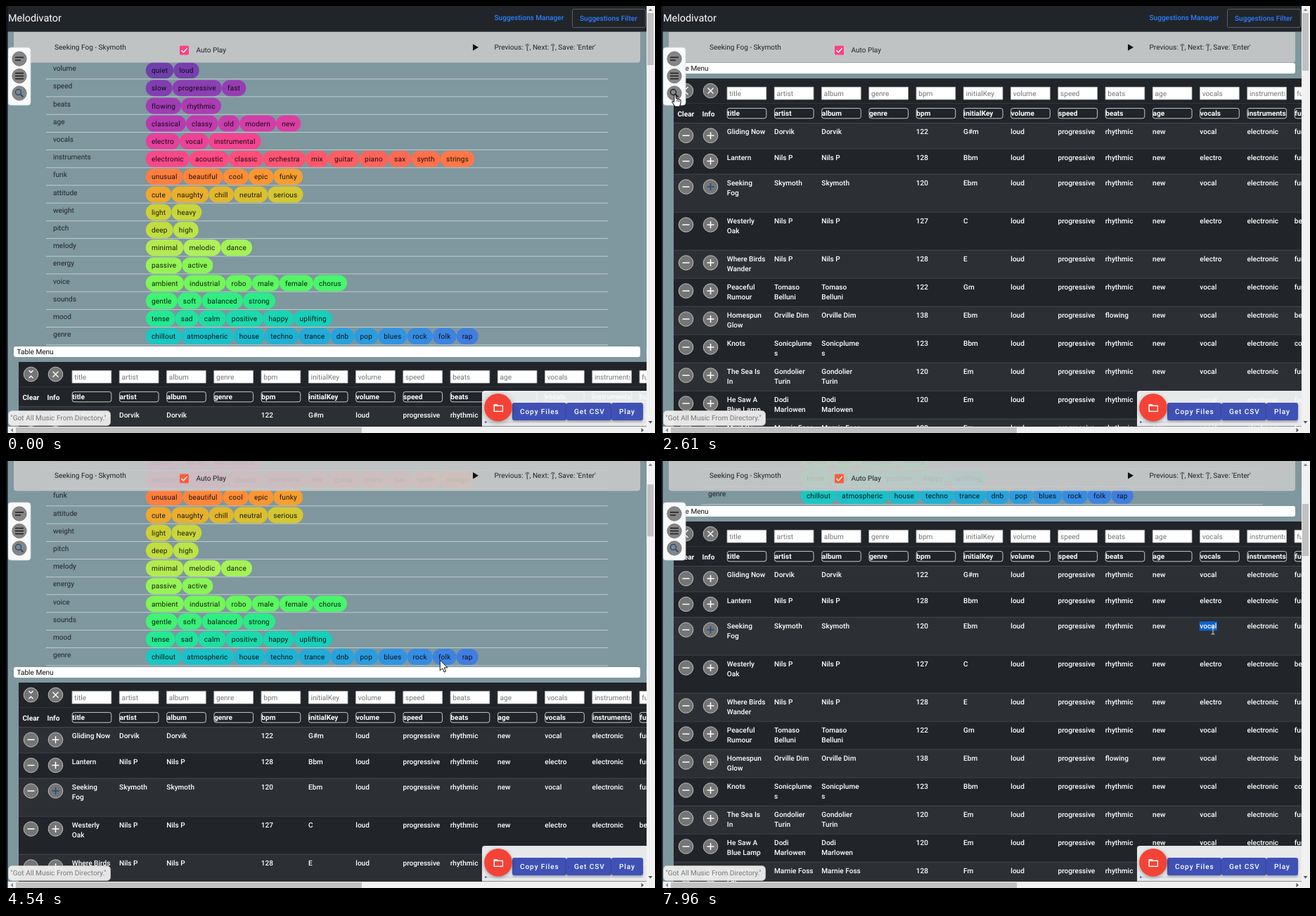
Animation of 923 by 607 pixels, one loop 8 s. Source, as an HTML page with a canvas:

```html
<!DOCTYPE html>
<html lang="en">
<head>
<meta charset="utf-8">
<title>Music table</title>
<style>
html, body { margin: 0; width: 100%; height: 100%; overflow: hidden; background: #7f979e; }
canvas { display: block; }
</style>
</head>
<body>
<canvas id="stage" width="923" height="607"></canvas>
<script>
const ctx = document.getElementById('stage').getContext('2d');
const LOOP = 8000, DARK = '#212529', FONT = 'Roboto, sans-serif';
const HAIR = 0.75; // thickness of a one-pixel rule at the page's zoom

const TAGS = [
  'volume: quiet loud', 'speed: slow progressive fast', 'beats: flowing rhythmic',
  'age: classical classy old modern new', 'vocals: electro vocal instrumental',
  'instruments: electronic acoustic classic orchestra mix guitar piano sax synth strings',
  'funk: unusual beautiful cool epic funky', 'attitude: cute naughty chill neutral serious',
  'weight: light heavy', 'pitch: deep high', 'melody: minimal melodic dance',
  'energy: passive active', 'voice: ambient industrial robo male female chorus',
  'sounds: gentle soft balanced strong', 'mood: tense sad calm positive happy uplifting',
  'genre: chillout atmospheric house techno trance dnb pop blues rock folk rap'
].map(line => {
  const [label, words] = line.split(': ');
  return { label, words: words.split(' ') };
});

const COLUMNS = ['title', 'artist', 'album', 'genre', 'bpm', 'initialKey', 'volume',
  'speed', 'beats', 'age', 'vocals', 'instruments', 'funk'];
const colX = i => 93.8 + i * 67.25;

// title | artist | bpm | key | beats | vocals | funk
const ROWS = [
  'Gliding Now|Dorvik|122|G#m|rhythmic|vocal|funky',
  'Lantern|Nils P|128|Bbm|rhythmic|electro|funky',
  'Seeking/Fog|Skymoth|120|Ebm|rhythmic|vocal|funky',
  'Westerly/Oak|Nils P|127|C|rhythmic|electro|beautiful',
  'Where Birds/Wander|Nils P|128|E|rhythmic|electro|funky',
  'Peaceful/Rumour|Tomaso/Belluni|122|Gm|rhythmic|vocal|funky',
  'Homespun/Glow|Orville Dim|138|Ebm|flowing|vocal|beautiful',
  'Knots|Sonicplume/s|123|Bbm|rhythmic|vocal|cool',
  'The Sea Is/In|Gondolier/Turin|120|Em|rhythmic|vocal|funky',
  'He Saw A/Blue Lamp|Dodi/Marlowen|120|Em|rhythmic|vocal|funky',
  'Must Go/Far|Marnie Foss|128|Fm|rhythmic|vocal|funky',
  'Tin Roof|Marnie Foss|124|Am|rhythmic|vocal|funky'
].map(line => {
  const [title, artist, bpm, key, beats, vocals, funk] = line.split('|');
  return [title, artist, artist, '', bpm, key, 'loud', 'progressive', beats, 'new',
    vocals, 'electronic', funk].map(cell => cell.split('/'));
});
const rowHeight = i => i < 2 ? 36.4 : i < 4 ? 54 : 40;

// time, x, y of the pointer tip
const POINTER = [
  [530, 893, 592], [1150, 312, 206], [1220, 255, 168], [1280, 200, 157],
  [1480, 42, 101], [1550, 32, 105], [1810, 30, 108], [2080, 20, 126], [2900, 20, 126],
  [3150, 130, 90], [3400, 290, 98], [3640, 365, 165], [3990, 352, 225], [4200, 420, 245],
  [4540, 617, 283], [5090, 761, 190], [5290, 775, 200], [5490, 775, 200],
  [5780, 768, 162], [6240, 794, 200], [6500, 794, 200], [7300, 783, 237],
  [7900, 783, 237], [7960, 785, 241]
];
const SCROLL = [[4060, 0], [4540, 191], [5070, 420]];

function track(keys, t) {
  if (t <= keys[0][0]) return keys[0].slice(1);
  for (let i = 1; i < keys.length; i++) {
    const a = keys[i - 1], b = keys[i];
    if (t < b[0]) {
      const f = (t - a[0]) / (b[0] - a[0]);
      return a.slice(1).map((v, k) => v + (b[k + 1] - v) * f);
    }
  }
  return keys[keys.length - 1].slice(1);
}

function rainbow(t) {
  const d = Math.abs(t - 0.5), s = 1.5 - 1.5 * d, l = 0.8 - 0.9 * d;
  const h = (360 * t + 20) * Math.PI / 180, a = s * l * (1 - l);
  const c = Math.cos(h), n = Math.sin(h);
  const rgb = [-0.14861 * c + 1.78277 * n, -0.29227 * c - 0.90649 * n, 1.97294 * c];
  return `rgb(${rgb.map(v => Math.round(255 * Math.min(1, Math.max(0, l + a * v))))})`;
}

function setFont(weight = 400, size = 10.08, spacing = 0) {
  ctx.font = `${weight} ${size}px ${FONT}`;
  ctx.letterSpacing = spacing + 'px';
  ctx.textRendering = 'geometricPrecision';
}

function text(str, x, y, color = DARK, weight, size, spacing) {
  setFont(weight, size, spacing);
  ctx.fillStyle = color;
  ctx.fillText(str, x, y + 3.6);
}

function box(x, y, w, h, fill, r = 0, stroke) {
  ctx.beginPath();
  ctx.roundRect(x, y, w, h, r);
  if (fill) { ctx.fillStyle = fill; ctx.fill(); }
  if (stroke) { ctx.strokeStyle = stroke; ctx.lineWidth = HAIR; ctx.stroke(); }
}

function disc(x, y, r, fill, stroke) {
  box(x - r, y - r, 2 * r, 2 * r, fill, r, stroke);
}

function lines(color, width, ...paths) {
  ctx.strokeStyle = color;
  ctx.lineWidth = width;
  ctx.beginPath();
  for (const p of paths)
    for (let i = 0; i < p.length; i += 2) ctx[i ? 'lineTo' : 'moveTo'](p[i], p[i + 1]);
  ctx.stroke();
}

function polygon(points, fill, stroke) {
  ctx.beginPath();
  for (let i = 0; i < points.length; i += 2) ctx.lineTo(points[i], points[i + 1]);
  ctx.closePath();
  ctx.fillStyle = fill;
  ctx.fill();
  if (stroke) { ctx.strokeStyle = stroke; ctx.lineWidth = 1; ctx.stroke(); }
}

function clipped(x, y, w, h, draw) {
  ctx.save();
  ctx.beginPath();
  ctx.rect(x, y, w, h);
  ctx.clip();
  draw();
  ctx.restore();
}

function drawTags(scroll) {
  let index = 0;
  TAGS.forEach(({ label, words }, i) => {
    const y = 91.5 + i * 25.2 - scroll;
    text(label, 67, y - 3);
    box(57, y + 11.9, 799, HAIR, '#d6dee0');
    let x = 198.8;
    for (const word of words) {
      setFont(400, 10.08, 0.18);
      const w = ctx.measureText(word).width + 16.2;
      box(x, y - 11.5, w, 23, rainbow(index++ / 80), 11.5);
      text(word, x + 8.1, y, 'rgba(0,0,0,.87)', 400, 10.08, 0.18);
      x += w;
    }
  });
}

function roundIcon(x, y) {
  disc(x, y, 10.3, '#757575', '#e4e4e4');
}

function isSelected(row, col, t) {
  if (t >= 7500) return row === 2 && col === 10;
  if (t < 5860 || t >= 6560) return false;
  return row === 0 ? col >= 10 : row === 1 && t >= 6040 && col <= 10;
}

function drawTable(top, t) {
  box(18, top + 15, 893, 700, DARK);
  const iconY = top + 32.5, headY = top + 64.5;
  roundIcon(35.5, iconY);
  roundIcon(70.5, iconY);
  lines('#fff', 1.4,
    [32.5, iconY - 5.5, 35.5, iconY - 2.5, 38.5, iconY - 5.5],
    [32.5, iconY + 5.5, 35.5, iconY + 2.5, 38.5, iconY + 5.5],
    [66.5, iconY - 4, 74.5, iconY + 4], [74.5, iconY - 4, 66.5, iconY + 4]);
  box(18, top + 50, 893, HAIR, '#373b3e');
  text('Clear', 23.5, headY + 0.5, '#fff', 700);
  text('Info', 58.5, headY + 0.5, '#fff', 700);
  COLUMNS.forEach((name, i) => {
    const x = colX(i);
    box(x + 0.3, top + 27.3, 55.6, 17.6, '#fff', 0, '#c4c4c4');
    clipped(x + 2, top + 27, 52, 18, () => text(name, x + 3.5, top + 36, '#757575'));
    box(x + 0.4, top + 57.4, 55.6, 14.4, null, 3, '#fff');
    text(name, x + 0.5, headY, '#fff', 700);
  });

  let y = top + 78;
  ROWS.forEach((cells, row) => {
    const h = rowHeight(row);
    box(18, y, 893, h, row % 2 ? DARK : '#2c3034');
    box(18, y, 893, HAIR, '#4d5154');
    const cy = y + 18.2;
    roundIcon(35.5, cy);
    roundIcon(70.5, cy);
    lines('#fff', 1.5, [30.5, cy, 40.5, cy]);
    lines(row === 2 ? '#1b4f80' : '#fff', 1.5,
      [65.5, cy, 75.5, cy], [70.5, cy - 5, 70.5, cy + 5]);
    cells.forEach((parts, col) => parts.forEach((part, n) => {
      const x = colX(col), ty = y + 12.7 + n * 14;
      if (part && isSelected(row, col, t)) {
        setFont(500);
        box(x - 0.5, ty - 6.3, ctx.measureText(part).width + 1, 13, '#0b63d1');
      }
      text(part, x, ty, '#fff', 500);
    }));
    y += h;
  });
}

function drawPlayer(scroll) {
  const y = Math.max(37 - scroll, -1);
  box(11, y, 891, 43.5, 'rgba(200,200,200,.9)', [0, 0, 4, 4]);
  text('Seeking Fog - Skymoth', 69, y + 21);
  box(247, y + 19.5, 13, 13, scroll > 100 ? '#ff5b3d' : '#ff4081', 1.5);
  lines('#fff', 1.5, [249.5, y + 26, 252.3, y + 29, 257.7, y + 23]);
  text('Auto Play', 270.5, y + 25.2);
  polygon([664, y + 17, 664, y + 26.5, 672, y + 21.7], '#111');
  text("Previous: '[', Next: ']', Save: 'Enter'", 694.5, y + 21);
}

function drawNav(scroll) {
  const y = -scroll;
  box(2, y, 909, 36.5, DARK);
  text('Melodivator', 3, y + 18.8, '#fff', 400, 14.4);
  text('Suggestions Manager', 694.5, y + 16, '#2b7fff', 500);
  box(805.5, y + 4.5, 104, 26, null, 2, '#6c757d');
  text('Suggestions Filter', 816, y + 17, '#2b7fff', 500);
}

function drawSidePanel(pressed) {
  box(3, 59, 32, 82, '#f8f9fa', 4, '#d4d9db');
  for (const y of [75, 99.5, 124]) disc(19, y, 10.2, '#858585', '#707070');
  lines('#1c1c1c', 1.5, [13, 73, 25, 73], [13, 77, 21, 77],
    [13, 95.5, 25, 95.5], [13, 99.5, 25, 99.5], [13, 103.5, 25, 103.5]);
  const ink = pressed ? '#222' : '#1b4f80';
  ctx.beginPath();
  ctx.arc(17.5, 122.5, 4, 0, 7);
  ctx.strokeStyle = ink;
  ctx.lineWidth = 1.4;
  ctx.stroke();
  lines(ink, 1.8, [20.5, 125.5, 24.5, 129.5]);
}

function drawToast() {
  box(3.5, 575.5, 145, 21, 'rgba(240,240,240,.95)', 5, '#ccc');
  text('"Got All Music From Directory."', 6.5, 585.5, '#777');
}

function drawActions(t) {
  box(677, 547, 234, 50.5, 'rgba(248,249,250,.92)', [4, 0, 0, 0]);
  box(681, 590.5, 225, 2, '#d5d8e6');
  box(681, 590.5, 2.5, 2, '#3f51b5');
  ctx.save();
  ctx.shadowColor = 'rgba(0,0,0,.35)';
  ctx.shadowOffsetY = 1.5;
  ctx.shadowBlur = 3;
  box(720, 564, 77, 25, '#3f51b5', 3);
  box(797, 564, 64, 25, '#3f51b5', 3);
  box(861, 564, 45, 25, '#3f51b5', 3);
  ctx.shadowBlur = t < 200 ? 9 - t / 50 : 5;
  disc(700, 570.7, 19.8, '#f44336');
  ctx.restore();
  text('Copy Files', 731, 576, '#fff', 500, 10.08, 0.9);
  text('Get CSV', 808, 576, '#fff', 500, 10.08, 0.9);
  text('Play', 872, 576, '#fff', 500, 10.08, 0.9);
  polygon([693.5, 566, 698.5, 566, 700, 567.5, 707, 567.5, 707, 577, 693.5, 577], '#fff');
  box(695, 569, 10.7, 6.6, '#f44336');
}

function drawBars(scroll, open) {
  box(911, 0, 12, 607, '#f1f1f1');
  box(2, 598, 921, 9, '#f1f1f1');
  box(912, 10 + scroll * 0.1215, 9, open ? 74 : 82, '#c1c1c1');
  box(14, 599, 492, 8, '#c1c1c1');
  polygon([913.5, 7, 919.5, 7, 916.5, 3.5], '#8a8a8a');
  polygon([913.5, 590, 919.5, 590, 916.5, 593.5], '#505050');
  polygon([10, 600, 10, 606, 6.5, 603], '#8a8a8a');
  polygon([903.5, 600, 903.5, 606, 907, 603], '#505050');
  box(0, 0, 2.5, 607, '#11161c');
}

function drawPointer(t) {
  if (t < 530) return;
  const [x, y] = track(POINTER, t);
  ctx.save();
  ctx.translate(x, y);
  if (t >= 1950 && t < 2930) {
    polygon([-1, 0, 1, 0, 1.5, 5.5, 8, 7.5, 8, 12, 6.5, 17, 0, 17, -4, 11, -4, 9, -1.5, 10.5],
      '#fff', '#000');
    lines('#000', 0.8, [3, 7, 3, 10], [5.5, 8, 5.5, 10.5]);
  } else if (t >= 5200) {
    lines('#d8d8d8', 1, [-2.5, -6, 2.5, -6], [0, -6, 0, 5], [-2.5, 5, 2.5, 5]);
  } else {
    polygon([0, 0, 0, 15, 3.5, 11.8, 6, 17.3, 8.3, 16.3, 5.9, 11, 10.6, 11], '#fff', '#111');
  }
  ctx.restore();
}

function render(t) {
  const open = t < 2540 || t >= 2900;
  const scroll = Math.round(track(SCROLL, t)[0]);
  const menuY = (open ? 491 : 88) - scroll;
  box(0, 0, 923, 607, '#7f979e');
  clipped(2, 0, 909, 598, () => {
    drawTable(menuY, t);
    if (open) drawTags(scroll);
    box(11, menuY - 7, 891, 15, '#fff', 3);
    text('Table Menu', 15.5, menuY, '#111');
    drawPlayer(scroll);
    drawNav(scroll);
    drawSidePanel(!open);
    drawToast();
    drawActions(t);
  });
  drawBars(scroll, open);
  drawPointer(t);
}

function tick() {
  render(performance.now() % LOOP);
  requestAnimationFrame(tick);
}
tick();
</script>
</body>
</html>
```
